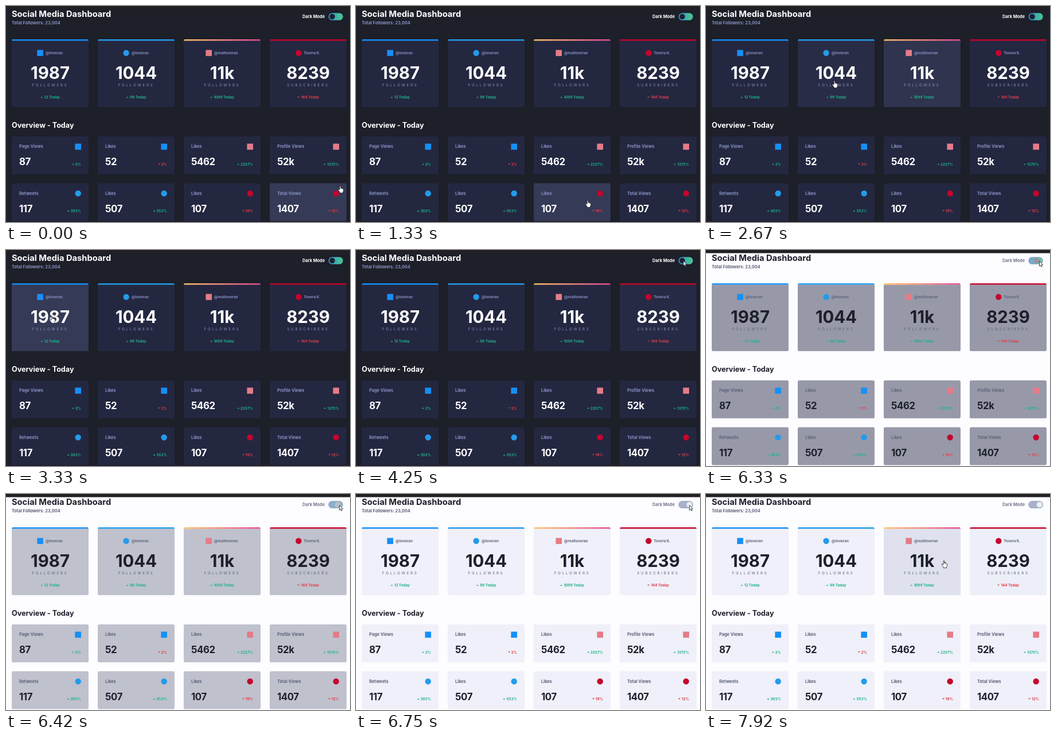
An HTML page for the animation above (8 s loop, 600 px wide and 376 px high).

```html
<!DOCTYPE html>
<html lang="en">
<head>
<meta charset="utf-8">
<title>Dashboard</title>
<style>
  html, body { margin: 0; width: 100%; height: 100%; overflow: hidden; }
  svg {
    display: block; width: 100%; height: 100%;
    --page: #1d1f29; --ink: #fff; --muted: #8490c0; --label: #fff;
    --up: #1fb189; --down: #dc3f4b;
    background: var(--page);
    font: 700 6.3px Inter, sans-serif;
  }
  svg.light { --page: #fdfcfe; --ink: #1d1f2b; --muted: #5f647b; --label: #757a90; }
  .ink { fill: var(--ink); }
  .muted { fill: var(--muted); }
  .label { fill: var(--label); }
  .up { fill: var(--up); }
  .down { fill: var(--down); }
  .title { font-size: 14.7px; }
  .head { font-size: 12.6px; }
  .mid { font-size: 7.35px; }
  .big { font-size: 29.4px; text-anchor: middle; }
  .count { font-size: 16.8px; letter-spacing: -.4px; }
  .caps { font-weight: 400; letter-spacing: 2.75px; text-anchor: middle; }
  .end { text-anchor: end; }
</style>
</head>
<body>
<svg id="stage" viewBox="0 0 600 376">
  <defs>
    <linearGradient id="warm"><stop stop-color="#fdc468"/><stop offset="1" stop-color="#df4996"/></linearGradient>
    <linearGradient id="cool"><stop stop-color="#378fe6"/><stop offset=".75" stop-color="#45bd98"/><stop offset="1" stop-color="#48c294"/></linearGradient>
  </defs>
  <rect width="600" height="5.5" fill="#222024"/>
  <g id="content"></g>
  <rect x="562.5" y="12.2" width="25.2" height="12.6" rx="6.3" fill="url(#cool)"/>
  <rect id="track" x="562.5" y="12.2" width="25.2" height="12.6" rx="6.3" fill="#aab0c8"/>
  <circle id="knob" cy="18.5" r="4.8"/>
  <g id="cursor" fill="#fff" stroke="#15161c" stroke-width=".8" stroke-linejoin="round">
    <path id="arrow" d="M0 0V8.6L2 6.8 3.4 9.8 4.8 9.1 3.4 6.3H6Z"/>
    <path id="hand" d="M-1 .8Q0-.8 1 .8V4.6Q2-.0 2.7 4.9 3.8 4 4.3 5.4 5.6 4.8 5.6 6.4V8.4Q5.4 10.4 4.5 11V12.6H-.9V11.2Q-2.2 9.4-3.6 7.3-4 5.6-2.4 6L-1 7.2Z"/>
  </g>
</svg>
<script>
const $ = id => document.getElementById(id);
const LOOP = 8000, FLIP = 6160, COLS = [10, 160, 310, 460], W = 134;
const BRANDS = {
  f: { color: '#178ff5', round: false },
  t: { color: '#249bea', round: true },
  i: { color: '#e47c88', round: false, bar: 'url(#warm)' },
  y: { color: '#c4062d', round: true }
};

// brand, icon x, handle x, handle, number, caption, change, arrow x
const TOP = [
  ['f', 54.3, 69, '@toveran', '1987', 'FOLLOWERS', '12 Today', 60.3],
  ['t', 204.3, 219, '@toveran', '1044', 'FOLLOWERS', '99 Today', 209.6],
  ['i', 348.4, 363, '@realtoveran', '11k', 'FOLLOWERS', '1099 Today', 356],
  ['y', 505, 519.3, 'Tovera K.', '8239', 'SUBSCRIBERS', '-144 Today', 508]
];
// brand, label, number, change, arrow offset in the card
const SMALL = [
  ['f', 'Page Views', '87', '3%', 104.8], ['f', 'Likes', '52', '-2%', 105],
  ['i', 'Likes', '5462', '2257%', 93.2], ['i', 'Profile Views', '52k', '1375%', 93.8],
  ['t', 'Retweets', '117', '303%', 96.4], ['t', 'Likes', '507', '553%', 96.4],
  ['y', 'Likes', '107', '-19%', 102], ['y', 'Total Views', '1407', '-12%', 102]
];

const text = (x, y, cls, s) => `<text x="${x}" y="${y}" class="${cls}">${s}</text>`;

function icon(key, x, y) {
  const { color, round } = BRANDS[key];
  return round
    ? `<circle cx="${x + 5.3}" cy="${y + 5.3}" r="5.2" fill="${color}"/>`
    : `<rect x="${x}" y="${y}" width="10.6" height="10.6" fill="${color}"/>`;
}

function change(s, arrowX, textX, y, cls = '') {
  const down = s[0] === '-', dir = down ? 'down' : 'up';
  const tri = down ? `M${arrowX} ${y - 3.5}h4.2l-2.1 2.1z` : `M${arrowX} ${y - 1.4}h4.2l-2.1-2.1z`;
  return `<path d="${tri}" class="${dir}"/>` + text(textX, y, `${dir} ${cls}`, s.replace('-', ''));
}

const cards = [];
let html = text(10, 19.4, 'ink title', 'Social Media Dashboard')
  + text(10, 31.6, 'muted mid', 'Total Followers: 23,004')
  + text(517, 21.2, 'label mid', 'Dark Mode')
  + text(10, 211.9, 'ink head', 'Overview - Today');

TOP.forEach(([key, ix, hx, handle, num, caption, diff, ax], i) => {
  const x = COLS[i], mid = x + W / 2, brand = BRANDS[key];
  cards.push({ x, y: 58, h: 118 });
  html += `<path class="card" d="M${x} 60.4h134v113q0 2.6-2.6 2.6h-128.8q-2.6 0-2.6-2.6z"/>`
    + `<path fill="${brand.bar || brand.color}" d="M${x} 60.5q0-2.5 2.5-2.5h129q2.5 0 2.5 2.5z"/>`
    + icon(key, ix, 76.5) + text(hx, 84.2, 'muted', handle)
    + text(mid, 127.3, 'ink big', num) + text(mid, 139.8, 'muted caps', caption)
    + change(diff, ax, ax + 6.4, 161.2);
});

SMALL.forEach(([key, label, num, diff, ax], i) => {
  const x = COLS[i % 4], y = i < 4 ? 227 : 308.4;
  cards.push({ x, y, h: 66 });
  html += `<rect class="card" x="${x}" y="${y}" width="134" height="66" rx="2.6"/>`
    + icon(key, x + 110.4, y + 12.6) + text(x + 13, y + 20.1, 'muted mid', label)
    + text(x + 13, y + 50.1, 'ink count', num)
    + change(diff, x + ax, x + 121, y + 50.7, 'end');
});
$('content').innerHTML = html;
const shapes = document.querySelectorAll('.card');

// pointer stops: time, x, y
const PATH = [
  [0, 583, 313], [60, 583, 313], [830, 404, 338], [1330, 404, 338], [1580, 520, 262],
  [2000, 520, 262], [2420, 345, 125], [2560, 345, 125], [2670, 224, 130], [2950, 75, 120],
  [3330, 80, 115], [3400, 80, 115], [3900, 525, 110], [4170, 571, 20], [4250, 571, 19],
  [4670, 574, 20], [5540, 574, 20], [5580, 576, 19], [5670, 581.5, 19.5], [6960, 581.5, 19.5],
  [7120, 530, 100], [7340, 230, 120], [7560, 500, 120], [7640, 500, 120], [7760, 415, 116],
  [LOOP, 415, 116]
];

function pointer(t) {
  const i = PATH.findIndex(p => p[0] > t);
  const [t0, x0, y0] = PATH[i - 1], [t1, x1, y1] = PATH[i];
  const u = (t - t0) / (t1 - t0), s = u * u * (3 - 2 * u);
  return [x0 + (x1 - x0) * s, y0 + (y1 - y0) * s];
}

const inside = (c, [x, y]) => x >= c.x && x <= c.x + W && y >= c.y && y <= c.y + c.h;
const mix = (a, b, k) => a.map((v, i) => v + (b[i] - v) * k);
const rgb = c => `rgb(${c.map(Math.round)})`;

const DARK = [36, 39, 64], DARK_HOVER = [53, 58, 86];
const LIGHT = [239, 240, 249], LIGHT_HOVER = [220, 223, 236];

function draw(t) {
  const u = Math.min(1, Math.max(0, (t - FLIP) / 560));
  const theme = 1 - (1 - u) ** 2.3;
  $('stage').classList.toggle('light', t >= FLIP);

  // hover fades over 250 ms: the share of recent moments spent on the card
  const trail = Array.from({ length: 25 }, (_, k) => pointer(Math.max(0, t - k * 10)));
  cards.forEach((c, i) => {
    const hover = trail.filter(p => inside(c, p)).length / trail.length;
    shapes[i].style.fill = rgb(mix(mix(DARK, DARK_HOVER, hover), mix(LIGHT, LIGHT_HOVER, hover), theme));
  });

  $('track').style.opacity = theme;
  $('knob').setAttribute('cx', 569 + 12.5 * theme);
  $('knob').style.fill = rgb(mix([30, 33, 46], [238, 239, 248], theme));

  const at = trail[0], onCard = cards.some(c => inside(c, at));
  $('cursor').setAttribute('transform', `translate(${at})`);
  $('hand').style.display = onCard ? '' : 'none';
  $('arrow').style.display = onCard ? 'none' : '';
}

const start = performance.now();
function tick() {
  draw((performance.now() - start) % LOOP);
  requestAnimationFrame(tick);
}
tick();
</script>
</body>
</html>
```
